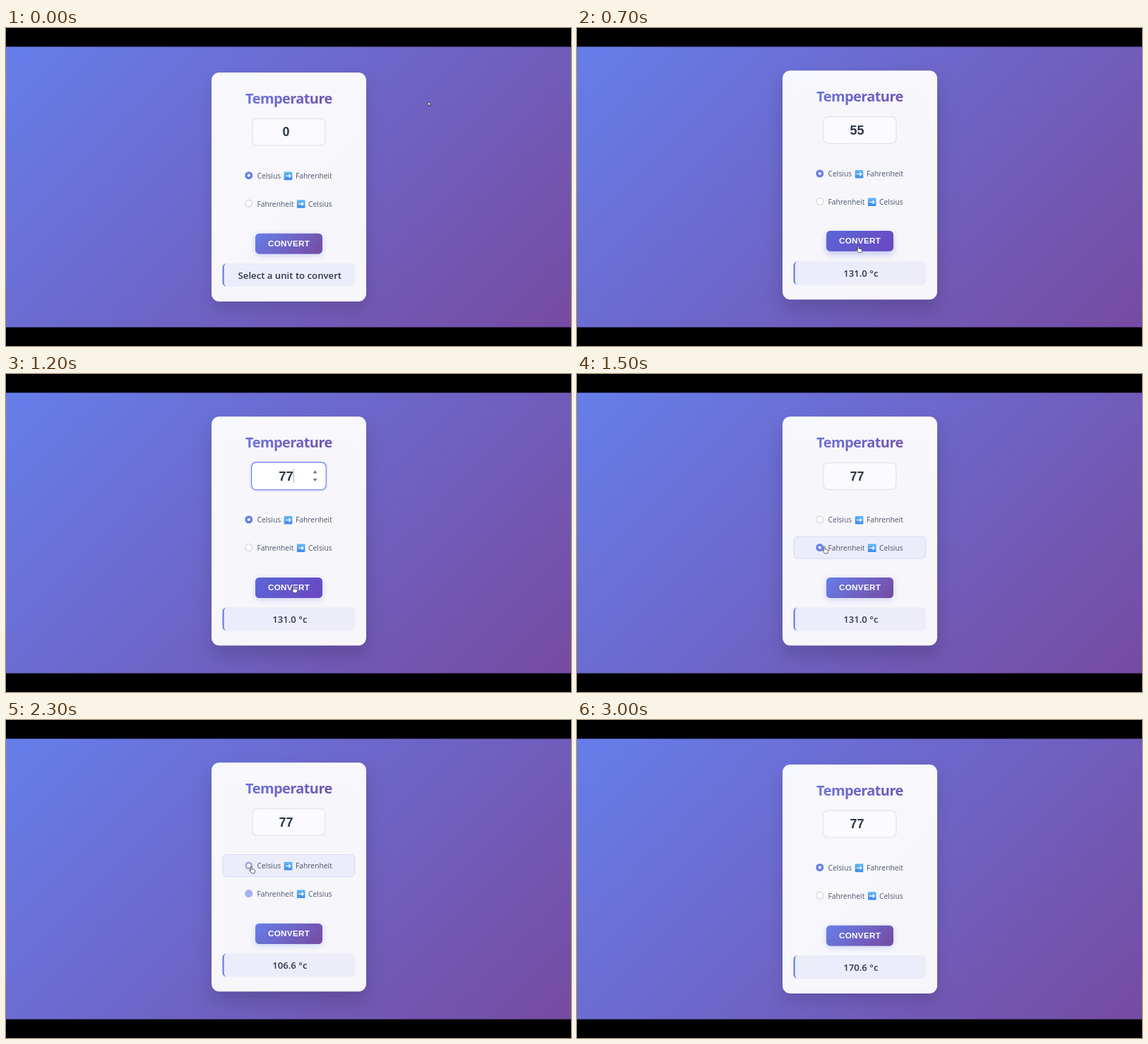
An HTML page that plays this animation: 800 px wide and 450 px high, repeating every 3.1 s.

```html
<!DOCTYPE html>
<html lang="en">
<head>
<meta charset="utf-8">
<title>Temperature converter</title>
<style>
html, body { margin: 0; width: 100%; height: 100%; overflow: hidden; background: #000; }
svg { display: block; width: 800px; height: 450px; }
text { font-family: "Open Sans", "Noto Sans", sans-serif; }
.mid { text-anchor: middle; }
.title { font-size: 20px; font-weight: 700; letter-spacing: -.6px; fill: url(#titleFill); }
.label { font-size: 10.3px; font-weight: 500; fill: #4a5568; }
.result { font-size: 13.2px; font-weight: 600; fill: #2d3748; }
.arial { font-family: "Liberation Sans", Arial, sans-serif; font-weight: 700; }
.value { font-size: 18px; }
.caption { font-size: 11.7px; letter-spacing: .3px; fill: #fff; }
.cursor { fill: #fff; stroke: #222; stroke-width: .7; stroke-linejoin: round; }
</style>
</head>
<body>
<svg viewBox="0 0 800 450">
  <defs>
    <g id="stops"></g>
    <linearGradient id="page" gradientUnits="userSpaceOnUse" x1="100.75" y1="-74.25" x2="699.25" y2="524.25">
      <stop stop-color="#667eea"/><stop offset="1" stop-color="#764ba2"/>
    </linearGradient>
    <linearGradient id="titleFill" href="#page" x1="346" y1="43" x2="454" y2="151"/>
    <linearGradient id="button" href="#page" x1="369.5" y1="271.5" x2="431.5" y2="333.5"/>
    <linearGradient id="buttonHover" gradientUnits="userSpaceOnUse" x1="369.5" y1="271.5" x2="431.5" y2="333.5">
      <stop stop-color="#5a67d8"/><stop offset="1" stop-color="#6b46c1"/>
    </linearGradient>
    <linearGradient id="sky" x2="0" y2="1">
      <stop stop-color="#62b8f8"/><stop offset="1" stop-color="#3c8ae6"/>
    </linearGradient>
    <g id="arrow">
      <rect x="-5.8" y="-5.8" width="11.6" height="11.6" rx="1" fill="url(#sky)"/>
      <path d="M-3.6 0H3.2M.9-2.5L3.4 0L.9 2.5" fill="none" stroke="#fff" stroke-width="1.3"/>
    </g>
  </defs>

  <rect y="26.5" width="800" height="397" fill="url(#page)"/>

  <g id="card">
    <rect id="panel" x="291" y="60.3" width="219" height="324" rx="11" fill="#fff" fill-opacity=".95"/>
    <text class="title mid" x="400.4" y="104.3">Temperature</text>

    <g id="field">
      <rect id="ring" x="347.5" y="124.2" width="105.6" height="40.4" rx="7.5" fill="none" stroke="#667eea" stroke-width="2"/>
      <rect id="box" x="348.9" y="125.6" width="103" height="37.7" rx="6.3" stroke-width="1.2"/>
      <rect id="selection" x="386.5" y="134" width="20" height="20.5" fill="#3367d1"/>
      <text id="value" class="arial value mid" x="396.5" y="150.7"></text>
      <rect id="caret" y="134.3" width=".8" height="20" fill="#333"/>
      <path id="spin" d="M433.8 140.6l2.9-4.2l2.9 4.2zM433.8 147.9h5.8l-2.9 4.2z" fill="#7b7b86"/>
    </g>

    <rect id="hover" x="306.9" width="187" height="31.2" rx="6" fill="#667eea" fill-opacity=".08" stroke="#667eea" stroke-opacity=".2"/>
    <g id="celsius" transform="translate(343.8 206)"><circle r="5.5"/><circle fill="#fff"/></g>
    <text class="label" x="355.5" y="210.4">Celsius</text>
    <use href="#arrow" x="399.5" y="206.7"/>
    <text class="label" x="410" y="210.4">Fahrenheit</text>

    <g id="fahrenheit" transform="translate(343.8 245.6)"><circle r="5.5"/><circle fill="#fff"/></g>
    <text class="label" x="355.5" y="250">Fahrenheit</text>
    <use href="#arrow" x="417.7" y="246.3"/>
    <text class="label" x="428" y="250">Celsius</text>

    <g id="convert">
      <rect id="face" x="353" y="288" width="95" height="29" rx="5.5"/>
      <text class="arial caption mid" x="400.6" y="306.2">CONVERT</text>
    </g>

    <rect x="306.5" y="330.2" width="187.5" height="33.2" rx="6" fill="#667eea" fill-opacity=".08"/>
    <path d="M312.5 330.2a6 6 0 0 0-6 6v21.2a6 6 0 0 0 6 6a3.8 6 0 0 1-3.8-6v-21.2a3.8 6 0 0 1 3.8-6z" fill="#667eea"/>
    <text id="result" class="result mid" x="401.8" y="352.4"></text>
  </g>

  <g id="pointer">
    <path id="tip" class="cursor" d="M-1.3-3v6l1.4-1.2l1 2l1-.5l-.9-1.9h1.8z"/>
    <path id="beam" d="M-1.5-3.3h1.2M.3-3.3h1.2M0-3V3M-1.5 3.3h1.2M.3 3.3h1.2" fill="none" stroke="#555" stroke-width=".8"/>
    <path id="hand" class="cursor" d="M-2.4-4.3q.9-1.1 1.7 0v3.4l3.4.8q1.1.4.9 1.7l-.7 3.2h-4.2l-3-3.6q.1-1.3 1.3-.5l.6.6z"/>
  </g>
</svg>
<script>
const $ = id => document.getElementById(id);
const set = (el, attrs) => { for (const k in attrs) el.setAttribute(k, attrs[k]); };
const show = (id, on) => set($(id), { opacity: +on });

// Radio looks: outer colour, radius of the white centre
const radio = {
  on: ['#667eea', 2.1], off: ['#cfd3e1', 4.3],
  rising: ['#a5aeda', 2.6], falling: ['#a4afee', 0]
};

// Each step lists only what changes; at = cursor position
const steps = {
  0: { at: [599, 107], cursor: 'tip', lift: 0, value: '0', focus: 0, caret: 0, spin: 0, selected: 0,
       c: 'on', f: 'off', over: '', raised: 0, result: 'Select a unit to convert' },
  100: { at: [522, 124] },
  200: { at: [418.5, 146], cursor: 'beam', lift: 1, focus: .3, caret: 1, spin: 1 },
  300: { value: '55', focus: 1 },
  500: { at: [409, 226], cursor: 'tip' },
  600: { at: [400, 311], cursor: 'hand', over: 'button', focus: .5, caret: 0 },
  700: { at: [400, 313], focus: 0, spin: 0, raised: 1, result: '131.0 °c' },
  800: { at: [416, 146], cursor: 'beam', over: '', raised: 0, focus: .3, spin: 1 },
  900: { at: [288, 76], focus: 1, selected: 1 },
  1000: { cursor: '', selected: 0, value: '77', caret: 1 },
  1100: { at: [420, 240], cursor: 'hand', over: 'f' },
  1200: { at: [409, 305], over: 'button', focus: .9, caret: .5 },
  1300: { at: [378, 256], over: 'f', spin: 0, caret: 0 },
  1400: { at: [356, 250], focus: 0, c: 'falling', f: 'rising' },
  1500: { at: [352, 249], c: 'off', f: 'on' },
  1600: { at: [368, 258] },
  1700: { at: [389, 304], over: 'button' },
  1800: { at: [392, 313], raised: 1, result: '106.6 °c' },
  1900: { at: [391, 311] },
  2000: { at: [381, 275], over: '', cursor: 'tip', raised: 0 },
  2100: { at: [362, 240], over: 'f', cursor: 'hand' },
  2200: { at: [350, 214], over: 'c' },
  2300: { at: [349, 212], c: 'rising', f: 'falling' },
  2400: { c: 'on', f: 'off' },
  2500: { at: [354, 217] },
  2600: { at: [378, 272], over: '', cursor: 'tip' },
  2700: { at: [397, 309], over: 'button', cursor: 'hand' },
  2800: { at: [399, 311], raised: 1, result: '170.6 °c' },
  2900: { at: [438, 47], over: '', cursor: 'tip', raised: 0, lift: .4 },
  3000: { cursor: '', lift: 0 }
};

function stateAt(time) {
  const state = {};
  for (const t in steps) if (+t <= time) Object.assign(state, steps[t]);
  return state;
}

function drawRadio(id, look) {
  const [outer, dot] = $(id).children;
  set(outer, { fill: radio[look][0] });
  set(dot, { r: radio[look][1] });
}

function draw(s) {
  set($('card'), { transform: `translate(0 ${2.7 * (1 - s.lift)})` });
  $('panel').style.filter =
    `drop-shadow(0 ${11 + 3 * s.lift}px ${10 + 3 * s.lift}px rgba(0,0,0,${.12 + .05 * s.lift}))`;

  const scale = s.focus ? 1.025 : 1;
  set($('field'), { transform: `translate(400.4 144.4) scale(${scale}) translate(-400.4 -144.4)` });
  set($('box'), { fill: s.focus ? '#fff' : '#fafaff' });
  $('box').style.stroke = `color-mix(in srgb, #667eea ${s.focus * 100}%, #e1e3ef)`;
  show('ring', 0);
  set($('ring'), { opacity: s.focus ? .15 : 0 });
  $('value').textContent = s.value;
  set($('value'), { fill: s.selected ? '#fff' : '#2d3748' });
  set($('caret'), { x: 396.5 + 5 * s.value.length, opacity: s.caret });
  show('spin', s.spin);
  show('selection', s.selected);

  drawRadio('celsius', s.c);
  drawRadio('fahrenheit', s.f);
  show('hover', s.over === 'c' || s.over === 'f');
  set($('hover'), { y: s.over === 'f' ? 230.1 : 190.5 });

  const hot = s.over === 'button';
  set($('convert'), { transform: `translate(0 ${-s.raised * 1.1})` });
  set($('face'), { fill: hot ? 'url(#buttonHover)' : 'url(#button)' });
  $('face').style.filter = s.raised
    ? 'drop-shadow(0 4px 5px rgba(102,126,234,.4))'
    : 'drop-shadow(0 2px 4px rgba(102,126,234,.3))';
  $('result').textContent = s.result;

  set($('pointer'), { transform: `translate(${s.at})` });
  for (const id of ['tip', 'beam', 'hand']) show(id, s.cursor === id);
}

function tick() {
  draw(stateAt(performance.now() % 3100));
  requestAnimationFrame(tick);
}
tick();
</script>
</body>
</html>
```
